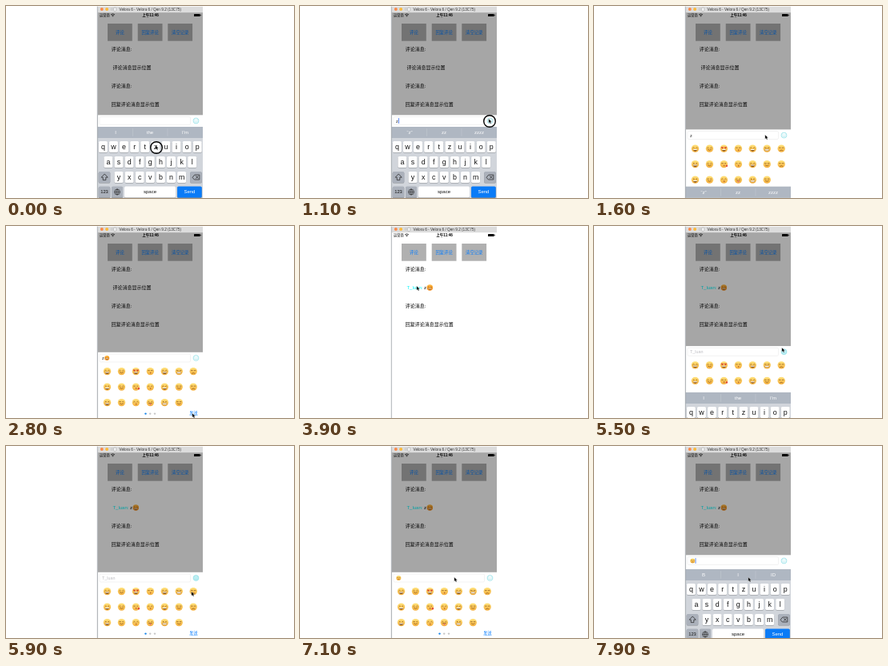
An HTML page that plays this animation: 360x240 px, repeating every 8000 ms.

```html
<!DOCTYPE html>
<html lang="zh">
<head>
<meta charset="utf-8">
<title>Comment keyboard</title>
<style>
html, body { margin: 0; width: 100%; height: 100%; overflow: hidden; background: #fff; }
svg { display: block; width: 100vw; height: 100vh; }
text { font-family: "Liberation Sans", "Noto Sans CJK SC", "Noto Sans CJK", sans-serif; dominant-baseline: central; }
</style>
</head>
<body>
<svg id="stage" viewBox="0 0 360 240"></svg>
<script>
const LOOP = 8000, STEP = 100;
const LEFT = 114.5, WIDTH = 131.5;
const KEY_TOP = 151, BAR_UP = 143.5, BAR_DOWN = 165;
const BLUE = '#007aff', TEAL = '#7fdbe4', INK = '#8a5518';
const USER = 'T_luan';

const rect = (x, y, w, h, fill, extra = '') =>
  `<rect x="${x}" y="${y}" width="${w}" height="${h}" fill="${fill}" ${extra}/>`;
const circle = (x, y, r, fill, extra = '') =>
  `<circle cx="${x}" cy="${y}" r="${r}" fill="${fill}" ${extra}/>`;
const text = (x, y, size, str, fill = '#000', extra = 'text-anchor="middle"') =>
  `<text x="${x}" y="${y}" font-size="${size}" fill="${fill}" ${extra}>${str}</text>`;
const line = (d, color, width) =>
  `<path d="${d}" fill="none" stroke="${color}" stroke-width="${width}" stroke-linecap="round" stroke-linejoin="round"/>`;
const group = (id, body) => `<g id="${id}">${body}</g>`;

// Face code: eyes, mouth, optional tint
const EYES = {
  '^': line('M-2.9-.7q.9-1.5 1.8 0M1.1-.7q.9-1.5 1.8 0', INK, .7),
  'o': circle(-1.7, -1, .7, INK) + circle(1.7, -1, .7, INK),
  '-': line('M-2.8-1h1.8M1-1h1.8', INK, .7),
  'h': '<path d="M-2 .5l-1.6-1.9q.8-1.6 1.6-.3q.9-1.3 1.6.3zM2 .5l-1.6-1.9q.8-1.6 1.6-.3q.9-1.3 1.6.3z" fill="#d84830"/>',
  'w': line('M-2.8-1h1.8', INK, .7) + circle(1.7, -1, .7, INK)
};
const MOUTHS = {
  'D': `<path d="M-2.7.8h5.4q-.5 2.7-2.7 2.7t-2.7-2.7z" fill="${INK}"/><path d="M-2.4.9h4.8l-.3.9h-4.2z" fill="#fff"/>`,
  'T': rect(-2.6, .8, 5.2, 1.9, '#fff', `rx=".8" stroke="${INK}" stroke-width=".4"`),
  'u': line('M-2 1.3q2 1.9 4 0', INK, .7),
  'n': line('M-1.7 2.6q1.7-1.5 3.4 0', INK, .7),
  'k': circle(.3, 2, .8, '#b4602c'),
  'x': circle(.2, 1.8, .8, '#b4602c') + circle(3.5, 2.2, 1.2, '#e04838'),
  'p': line('M-2 1h4', INK, .7) + rect(-.9, 1.2, 2.1, 2.2, '#ea7a70', 'rx="1"')
};
const face = (x, y, code, scale = 1) =>
  `<g transform="translate(${x} ${y}) scale(${scale})">` +
  circle(0, 0, 4.7, code[2] ? 'url(#hot)' : 'url(#sun)') + EYES[code[0]] + MOUTHS[code[1]] + '</g>';

const FACES = [
  ['^D', '^u', 'hD', '-k', '^D', '-T', '-n'],
  ['oD', '^u', 'wx', '^k', '^D', '-u', '-n'],
  ['oD', 'wu', '^k', '^p', 'oT', '-u']
];

function key(cx, y, w, label, fill = '#fff', color = '#111', size = 8.9) {
  return rect(cx - w / 2, y + .6, w, 14, '#888b90', 'rx="1.6"') +
    rect(cx - w / 2, y, w, 14, fill, 'rx="1.6"') + text(cx, y + 6.9, size, label, color);
}

function keyboard() {
  const pitch = 13.1, dark = '#abb1bb';
  const rows = [['qwertzuiop', 0], ['asdfghjkl', .5], ['yxcvbnm', 1.5]];
  let out = rect(LEFT, KEY_TOP, WIDTH, 100, '#d1d5db') + rect(LEFT, KEY_TOP, WIDTH, 14, '#afb7c2');
  out += line('M158.5 153.5v9M202 153.5v9', '#c5cad2', .5);
  [137, 180, 224].forEach((x, i) => { out += `<text id="hint${i}" x="${x}" y="157.8" font-size="6" fill="#fff" text-anchor="middle"></text>`; });
  rows.forEach(([letters, indent], r) => [...letters].forEach((ch, i) => {
    out += key(LEFT + .3 + pitch * (i + .5 + indent), 169 + r * 19, 11, ch);
  }));
  out += key(123, 207, 14.5, '', dark) + key(237.5, 207, 14.5, '', dark);
  out += line('M123 210.2l-3.8 4h2v3.4h3.6v-3.4h2z', '#222', .7);
  out += line('M233.3 214l2.5-3h6v6h-6zM237.5 212.6l2.6 2.8M240.1 212.6l-2.6 2.8', '#222', .7);
  out += key(123, 225.5, 14.5, '123', dark, '#111', 5.8) + key(139, 225.5, 14, '', dark);
  out += circle(139, 232.5, 3.5, 'none', 'stroke="#222" stroke-width=".6"');
  out += line('M135.5 232.5h7M139 229v7M139 229q-3.6 3.5 0 7q3.6-3.5 0-7', '#222', .5);
  out += key(180, 225.5, 64, 'space', '#fff', '#111', 6) + key(229.4, 225.5, 30.7, 'Send', '#0a7bf7', '#fff', 6);
  return out;
}

function inputPanel() {
  let out = rect(LEFT, -7.2, WIDTH, 120, '#fff');
  out += rect(117, -5, 113.5, 10, '#fff', 'rx="1.5" stroke="#e4e4e4" stroke-width=".5"');
  out += circle(237.5, 0, 3.4, '#fff', `id="smiley" stroke="${TEAL}" stroke-width=".7"`);
  out += circle(236.2, -.9, .5, TEAL) + circle(238.8, -.9, .5, TEAL) + line('M235.8 1q1.7 1.6 3.4 0', TEAL, .6);
  out += group('field', '');
  FACES.forEach((row, r) => row.forEach((code, i) => { out += face(126.5 + 17.95 * i, 16.6 + 19.5 * r, code); }));
  [174.5, 180.2, 186].forEach((x, i) => { out += circle(x, 69.6, 1.2, i ? '#c6c6c6' : '#1b86e8'); });
  return out + text(234.5, 69.2, 5.2, '发送', BLUE);
}

function page() {
  const start = 'text-anchor="start"';
  let out = rect(LEFT, 8, WIDTH, 232, '#fff');
  out += text(117, 11.4, 4.2, '运营商', '#000', start);
  out += line('M131.3 10.6q2.2-1.9 4.4 0M132.4 11.8q1.1-1 2.2 0', '#000', .7) + circle(133.5, 12.7, .5, '#000');
  out += text(180.5, 11.4, 4.6, '上午11:46', '#000', 'text-anchor="middle" font-weight="bold"');
  out += rect(235, 9.9, 7.6, 3.2, '#000', 'rx=".6"') + rect(243, 10.8, .7, 1.4, '#000');
  [['评论', 127], ['回复评论', 164.7], ['清空记录', 202.3]].forEach(([label, x]) => {
    out += rect(x, 22, 30.8, 21.7, '#b0b0b0') + text(x + 15.4, 32.8, 5.3, label, BLUE);
  });
  out += text(131.7, 54, 6, '评论消息:', '#000', start) + group('message', '');
  out += text(131.7, 100, 6, '评论消息:', '#000', start);
  return out + text(131.7, 123, 6, '回复评论消息显示位置', '#000', start);
}

function titleBar() {
  let out = rect(LEFT, .8, WIDTH, 7.4, '#dcdcdc');
  ['#f98a4c', '#fbb93c', '#cfcfcf'].forEach((c, i) => { out += circle(119.8 + 6.3 * i, 4.1, 2, c); });
  out += rect(135, 2, 2.6, 4.2, '#fff', 'stroke="#888" stroke-width=".4"');
  return out + text(180.3, 4.2, 4.7, 'Velora 6 - Velora 6 / Qen 9.2 (13C75)', '#333');
}

const gradient = (id, a, b) =>
  `<linearGradient id="${id}" x2="0" y2="1"><stop stop-color="${a}"/><stop offset="1" stop-color="${b}"/></linearGradient>`;

document.getElementById('stage').innerHTML =
  `<defs>${gradient('sun', '#ffe27a', '#f4ad3c')}${gradient('hot', '#ffb840', '#f58a1c')}
  <clipPath id="screen"><rect x="${LEFT}" y="0" width="${WIDTH}" height="240"/></clipPath></defs>` +
  rect(0, 0, 360, 240, '#fff') +
  '<g clip-path="url(#screen)">' + page() + rect(LEFT, 8, WIDTH, 232, '#000', 'id="shade"') +
  group('panel', inputPanel()) + group('keys', keyboard()) + titleBar() + '</g>' +
  line('M114.3 1v239', '#59636c', .5) +
  group('pointer', circle(0, 0, 7.3, 'none', 'id="ring" stroke="#000" stroke-width="1.4"') +
    '<path d="M-1.2-3v5.2l1.2-1 .9 1.9 1.1-.5-.9-1.9h1.7z" fill="#000" stroke="#fff" stroke-width=".3"/>');

const $ = id => document.getElementById(id);

// Time, x, y
const POINTER = [
  [0, 188, 177], [400, 188, 177], [1000, 237, 144], [1300, 237, 144], [1600, 215, 164],
  [1900, 197, 182], [2200, 197, 182], [2700, 234, 237], [3000, 234, 237], [3800, 147, 78],
  [4400, 147, 78], [4700, 204, 122], [5000, 237, 145], [5400, 237, 145], [5800, 233, 185],
  [6200, 233, 185], [6900, 194, 167], [LOOP, 194, 167]
];
const CLICKS = [0, 1100, 1900, 2900, 4100, 5100, 6000, 7300];
// Start, duration, destination
const BAR = [[1300, 500, BAR_DOWN], [3000, 400, 249], [4300, 455, BAR_UP], [5300, 500, BAR_DOWN], [7500, 400, BAR_UP]];
const KEYS = [[1300, 500, 240], [4300, 570, KEY_TOP], [5300, 500, 240], [7500, 490, KEY_TOP]];
const SHADE = [[3000, 300, 0], [4300, 300, .35]];

function slide(value, moves, t) {
  for (const [start, duration, to] of moves) {
    if (t < start) break;
    const rest = 1 - Math.min(1, (t - start) / duration);
    value = to + (value - to) * rest * rest;
  }
  return value;
}

function pointerAt(t) {
  const i = POINTER.findIndex(p => p[0] > t);
  const [t0, x0, y0] = POINTER[i - 1], [t1, x1, y1] = POINTER[i];
  const p = (t - t0) / (t1 - t0);
  return [x0 + (x1 - x0) * p, y0 + (y1 - y0) * p];
}

function fieldAt(t) {
  const start = 'text-anchor="start"';
  const typed = t >= 200 && t < 3000, picked = t >= 6000;
  const caret = (t >= 200 && t < 1300) || (t >= 4400 && t < 5300) || t >= 7500;
  let out = '', end = 120.7;
  if (typed) { out += text(120, 0, 5.4, 'z', '#222', start); end = 123.5; }
  if (typed && t >= 2000) out += face(126.2, 0, '^D!', .65);
  if (t >= 4300 && !picked) out += text(120, 0, 5.4, USER, '#bdbdc2', start);
  if (picked) { out += face(123.3, 0, '-n', .65); end = 127; }
  return out + (caret ? line(`M${end}-3v6`, '#3b6ff0', .8) : '');
}

function messageAt(t) {
  const start = 'text-anchor="start"';
  if (t < 3000) return text(133.4, 77, 6, '评论消息显示位置', '#000', start);
  return text(133.4, 77, 6, `<tspan fill="#00f4f8">${USER}:</tspan> z`, '#000', start) + face(162.3, 77, '^D!', .8);
}

function render(t) {
  const bar = slide(BAR_UP, BAR, t), keys = slide(KEY_TOP, KEYS, t);
  const [x, y] = pointerAt(t);
  const hints = t >= 7500 ? ['B', 'I', 'ID'] : t >= 200 && t < 3000 ? ['“z”', 'zz', 'zzzz'] : ['I', 'the', 'I’m'];
  $('panel').setAttribute('transform', `translate(0 ${bar})`);
  $('keys').setAttribute('transform', `translate(0 ${keys - KEY_TOP})`);
  $('shade').setAttribute('opacity', slide(.35, SHADE, t));
  $('pointer').setAttribute('transform', `translate(${x} ${y})`);
  $('ring').setAttribute('visibility', CLICKS.some(c => t >= c && t < c + 200) ? 'visible' : 'hidden');
  $('smiley').setAttribute('fill', t >= 5200 && t < 6100 ? '#c9f1f5' : '#fff');
  $('field').innerHTML = fieldAt(t);
  $('message').innerHTML = messageAt(t);
  hints.forEach((word, i) => { $('hint' + i).textContent = word; });
}

const begin = performance.now();
function tick() {
  const t = (performance.now() - begin) % LOOP;
  render(Math.floor(t / STEP) * STEP);
  requestAnimationFrame(tick);
}
tick();
</script>
</body>
</html>
```
